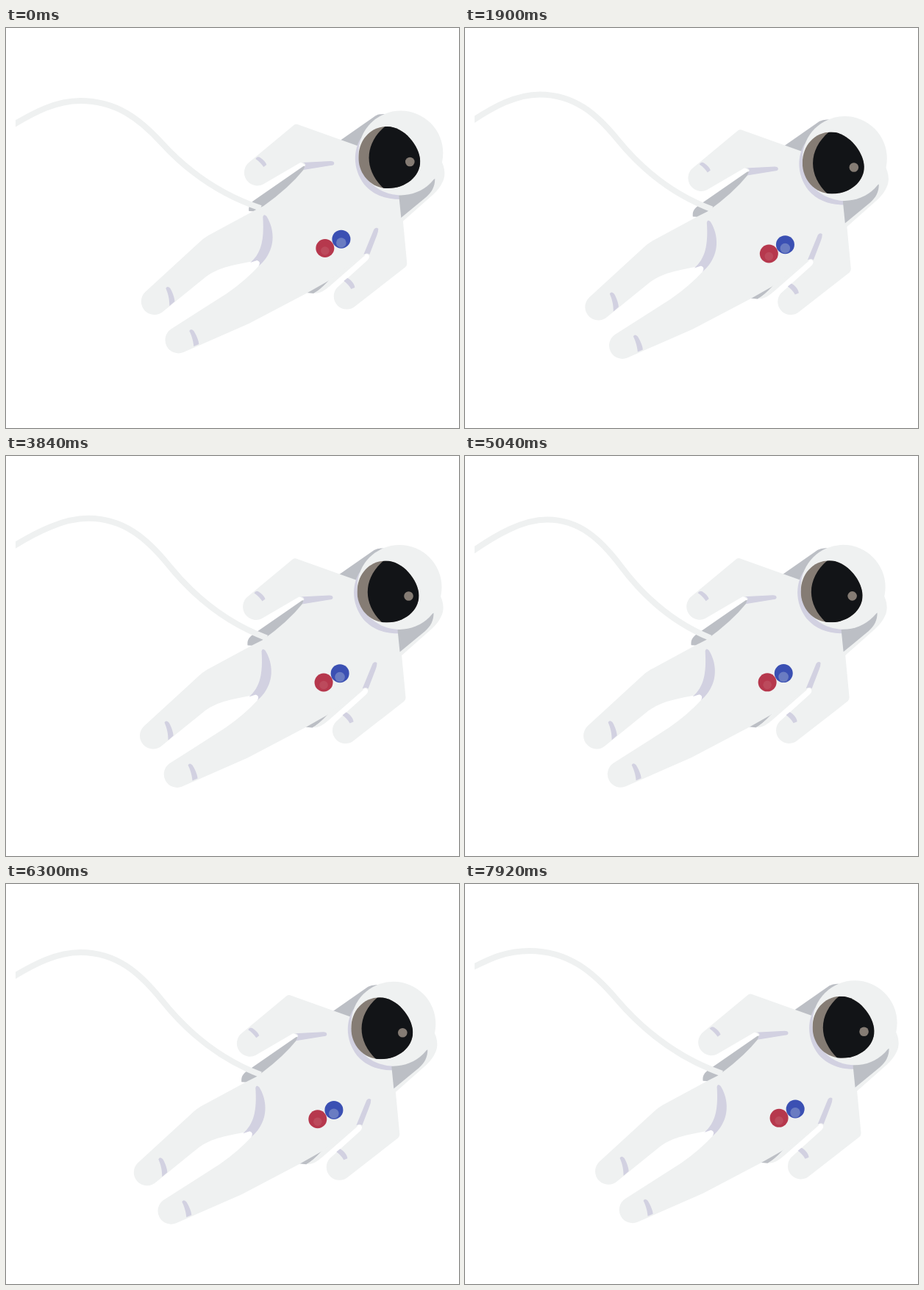
Recreate the animation shown at these times as an HTML page. Size 616 by 544 pixels, loop 8 s.

```html
<!DOCTYPE html>
<html lang="en">
<head>
<meta charset="utf-8">
<title>Drifting astronaut</title>
<style>
  html, body { margin: 0; width: 100%; height: 100%; overflow: hidden; background: #fff; }
  svg { display: block; width: 616px; height: 544px; }
  .suit { fill: #eff1f1; }
  .pack { fill: #bcbfc5; }
  .shade { fill: #d2d1e1; }
  .glass { fill: #121417; }
  .glare { fill: #857c74; }
  #tether { fill: none; stroke: #eff1f1; stroke-width: 8; }
</style>
</head>
<body>
<svg viewBox="0 0 616 544">
  <clipPath id="edge"><path d="M13 0H616V544H13Z"/></clipPath>
  <clipPath id="visor"><path d="M518 134C541 134 562 160 563 181C563 202 543 218 519 218C495 218 479 198 479 176C479 153 495 134 518 134Z"/></clipPath>

  <g id="astronaut">
    <!-- backpack -->
    <path class="pack" d="M454 153L502 119.500Q507 116.500 515 117L520 150L480 164Z"/>
    <path class="pack" d="M330 249C329 241 333 237 339 233L404 188L412 187L405 205L350 250Z"/>
    <path class="pack" d="M408 360L418 361Q426 357 440 343L430 340Z"/>
    <path class="suit" d="M418 361C428 361 434 356 440 351L488 309L478 308L438 344Q426 357 418 361Z"/>
    <path class="suit" d="M590 178C596 187 598 199 594 208C591 215 587 220 581 226L537 265L534 230Z"/>

    <!-- suit -->
    <path class="suit" d="M396 131L480 161L536 225L545 320Q545 323 543 325L475 378A17.7 17.7 0 0 1 450 353L491 316Q496 311 492 308Q489 306 484 311L438 344L408 361L330 402L241 441A18 18 0 0 1 224 409.5L300 361Q326 343 345 322Q346 317 341 316C310 322 290 325 272 338L214 385A17.9 17.9 0 0 1 189 359L262 292Q268 286 275 282L338 248L350 242Q385 217 405 192Q409 185 400 183L352 211A17.9 17.9 0 0 1 331 182L390 133Q393 130 396 131Z"/>

    <!-- folds and cuffs -->
    <path class="shade" d="M404 193L407 186Q406 183 402 183L441 181Q446 181 446 184Q446 187 441 187Z"/>
    <path class="shade" d="M339 178Q341 174 345 176C350 179 353 183 354 186L350 189C347 185 344 181 339 178Z"/>
    <path class="shade" d="M500 274Q503 270 506 273Q506 277 504 282L494 308Q491 305 486 308Z"/>
    <path class="shade" d="M464 340C470 343 474 349 474 353L469 355C466 350 463 347 459 344Z"/>
    <path class="shade" d="M349 257Q350 252 354 256C364 272 364 290 359 302C355 312 350 318 343 324Q347 318 341 316L332 319C347 306 351 288 349 257Z"/>
    <path class="shade" d="M217 354Q219 350 223 354C227 361 229 368 229 372L222 378C222 368 220 361 217 354Z"/>
    <path class="shade" d="M249 412Q251 408 255 412C260 420 262 427 262 430L255 433C254 424 252 418 249 412Z"/>

    <!-- helmet -->
    <path class="shade" d="M482 150C470 170 473 195 487 213C500 228 517 233 536 233L545 215L490 150Z"/>
    <path class="pack" d="M534 228L583 205C583 215 579 223 571 230L537 258Z"/>
    <circle class="suit" cx="536.5" cy="170" r="57.5"/>
    <g clip-path="url(#visor)">
      <path class="glare" d="M470 130H570V222H470Z"/>
      <path class="glass" d="M516 133C486 158 486 193 514 219H570V130Z"/>
    </g>
    <circle class="glare" cx="549" cy="182" r="6.3"/>

    <!-- badges -->
    <circle cx="455.6" cy="287.2" r="12.5" fill="#3b50b3"/>
    <circle cx="455.5" cy="292" r="6.8" fill="#6a7cc2"/>
    <circle cx="433.5" cy="299.5" r="12.5" fill="#b6384d"/>
    <circle cx="433.5" cy="303" r="5.8" fill="#bc4a5c"/>
  </g>
  <g clip-path="url(#edge)"><path id="tether"/></g>
</svg>
<script>
  const LOOP = 8000;

  // Each motion swings between its turning points: [time, value].
  const driftX = [[-200, 1], [1600, -22], [3320, 3], [5230, -23], [7400, 6], [8540, -23]];
  const driftY = [[0, 0], [600, -1.6], [1900, 7.5], [2950, 3], [3800, 8.5], [4750, 7.6], [6700, 22], [7600, 17.6], [8500, 22]];
  const slack = [[0, 0], [1900, 1]];
  const crestX = [[1400, 101], [4500, 113], [8300, 87]];
  const crestY = [[0, 99], [1300, 91], [4300, 84.5], [6600, 93.5], [9000, 89]];
  const leftY = [[0, 129], [1000, 125], [3700, 120], [5200, 128], [8400, 109]];

  // Poses are held: [start, step].
  const beats = [[5040, 110.7], [3840, 100], [2820, 150], [0, 100]];

  function hold(t) {
    const [start, step] = beats.find(b => t >= b[0]);
    return start + Math.floor((t - start) / step) * step;
  }

  function swing(points, t) {
    const next = points.findIndex(p => p[0] > t);
    if (next < 1) return points.at(next)[1];
    const [t0, a] = points[next - 1], [t1, b] = points[next];
    return a + (b - a) * (1 - Math.cos(Math.PI * (t - t0) / (t1 - t0))) / 2;
  }

  // left edge, crest, falling middle, joint at the body
  function ropePath(y, px, py, ex, ey) {
    const w = ex - px, h = ey - py, y0 = y + 7;
    const mx = px + .45 * w, my = py + .39 * h;
    return `M3 ${y0}C${3 + .38 * (px - 3)} ${y0 + .62 * (py - y0)} ${px - 32} ${py} ${px} ${py}`
      + `C${px + .2 * w} ${py} ${mx - .12 * w} ${my - .22 * h} ${mx} ${my}`
      + `C${mx + .13 * w} ${my + .24 * h} ${ex - .25 * w} ${ey - .14 * h} ${ex} ${ey}`;
  }

  const astronaut = document.getElementById('astronaut');
  const tether = document.getElementById('tether');
  const begin = performance.now();

  function draw() {
    const t = hold((performance.now() - begin) % LOOP);
    const dx = swing(driftX, t), dy = swing(driftY, t), s = swing(slack, t);
    astronaut.setAttribute('transform', `translate(${dx} ${dy})`);
    tether.setAttribute('d', ropePath(
      swing(leftY, t), swing(crestX, t), swing(crestY, t),
      346 + 10 * s + dx, 245 - 6 * s + dy));
    requestAnimationFrame(draw);
  }
  draw();
</script>
</body>
</html>
```
